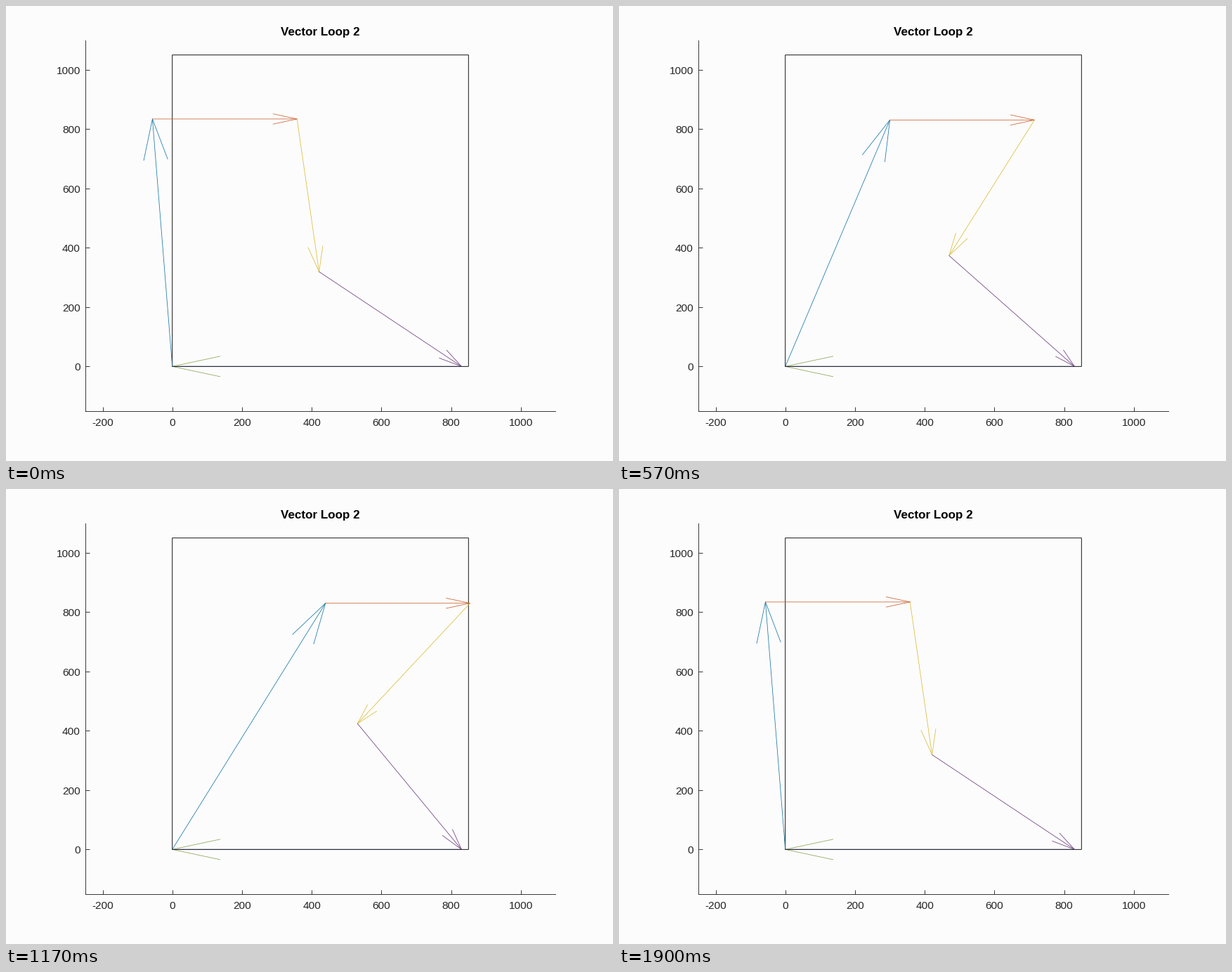
Animation of 864x648 px, one loop 1.93 s. Source, as a matplotlib script:

```python
import numpy as np
import matplotlib.pyplot as plt
from matplotlib.animation import FuncAnimation

W, H, DPI = 864, 648, 72  # one point equals one pixel
LOOP_MS, TICK_MS = 1930, 10
STEPS = 28  # poses in one sweep, minus one
INK = "#262626"
BLUE, ORANGE, YELLOW = "#1E7AA4", "#CB6633", "#DCBE3C"
PURPLE, GREEN, NAVY = "#6F4280", "#8FA858", "#1A1540"

# Chebyshev linkage, proportions 4 : 2 : 5
GROUND, COUPLER, ARM = 830.0, 415.0, 1037.5
START, STOP = np.radians([97.0, 39.05])
ORIGIN, PIVOT = np.zeros(2), np.array([GROUND, 0.0])

plt.rcParams["font.family"] = "Liberation Sans"
fig = plt.figure(figsize=(W / DPI, H / DPI), dpi=DPI, facecolor="#FCFCFD")

X0, Y0, AW, AH = 112.7, 71.28, 669.6, 528.1
ax = fig.add_axes([X0 / W, Y0 / H, AW / W, AH / H], facecolor="none")
ax.set(xlim=(-250, 1100), ylim=(-150, 1100),
       xticks=range(-200, 1001, 200), yticks=range(0, 1001, 200))
ax.tick_params(direction="in", length=6, width=0.9, color=INK,
               labelbottom=False, labelleft=False)
for side, spine in ax.spines.items():
    spine.set_visible(side in ("left", "bottom"))
    spine.set(linewidth=0.9, color=INK)


def label(x, y, text, size=15.4, **style):
    """Text with its baseline at pixel (x, y), measured from the top left."""
    fig.text(x / W, 1 - y / H, text, fontsize=size, **{"color": INK, **style})


for v in range(-200, 1001, 200):
    label(X0 + (v + 250) * AW / 1350, 598.5, str(v), ha="center")
    if v >= 0:
        label(106, H - Y0 - (v + 150) * AH / 1250 + 6, str(v), ha="right")
label(447.5, 42, "Vector Loop 2", 17, ha="center", weight="bold", color="black")

ax.plot([0, 0, 850, 850, 0], [0, 1050, 1050, 0, 0], color="black", lw=0.9,
        zorder=3, snap=False)
ax.plot([0, GROUND], [0, 0], color=NAVY, lw=0.9, zorder=5, snap=False)


class Arrow:
    def __init__(self, color):
        style = dict(color=color, lw=0.8, zorder=4, snap=False,
                     solid_joinstyle="miter")
        self.shaft, = ax.plot([], [], **style)
        self.head, = ax.plot([], [], **style)

    def place(self, tail, tip):
        d = tip - tail
        back = 0.165 * np.abs(d).max() * d / np.hypot(*d)
        side = 0.25 * np.array([-back[1], back[0]])
        self.shaft.set_data(*np.transpose([tail, tip]))
        self.head.set_data(*np.transpose([tip - back + side, tip, tip - back - side]))


arrows = [Arrow(c) for c in (BLUE, ORANGE, YELLOW, PURPLE, GREEN)]


def joints(angle):
    """Coupler midpoint and middle of the second arm for a given first arm angle."""
    b = ARM * np.array([np.cos(angle), np.sin(angle)])
    d = b - PIVOT
    dist = np.hypot(*d)
    u = d / dist
    along = (dist**2 + ARM**2 - COUPLER**2) / (2 * dist)
    off = np.sqrt(ARM**2 - along**2)
    a = PIVOT + along * u + off * np.array([-u[1], u[0]])
    return (a + b) / 2, (a + PIVOT) / 2


def update(tick):
    n = int((tick + 0.5) * 0.3)  # 30 poses per second
    n = min(n, 2 * STEPS + 1 - n)  # sweep out and back
    mid, knee = joints(START + (STOP - START) * n / STEPS)
    points = [ORIGIN, mid, mid + [COUPLER, 0], knee, PIVOT, ORIGIN]
    for arrow, tail, tip in zip(arrows, points, points[1:]):
        arrow.place(tail, tip)
    return [line for a in arrows for line in (a.shaft, a.head)]


anim = FuncAnimation(fig, update, frames=LOOP_MS // TICK_MS, interval=TICK_MS,
                     repeat=True, repeat_delay=0, blit=False)
plt.show()
```
